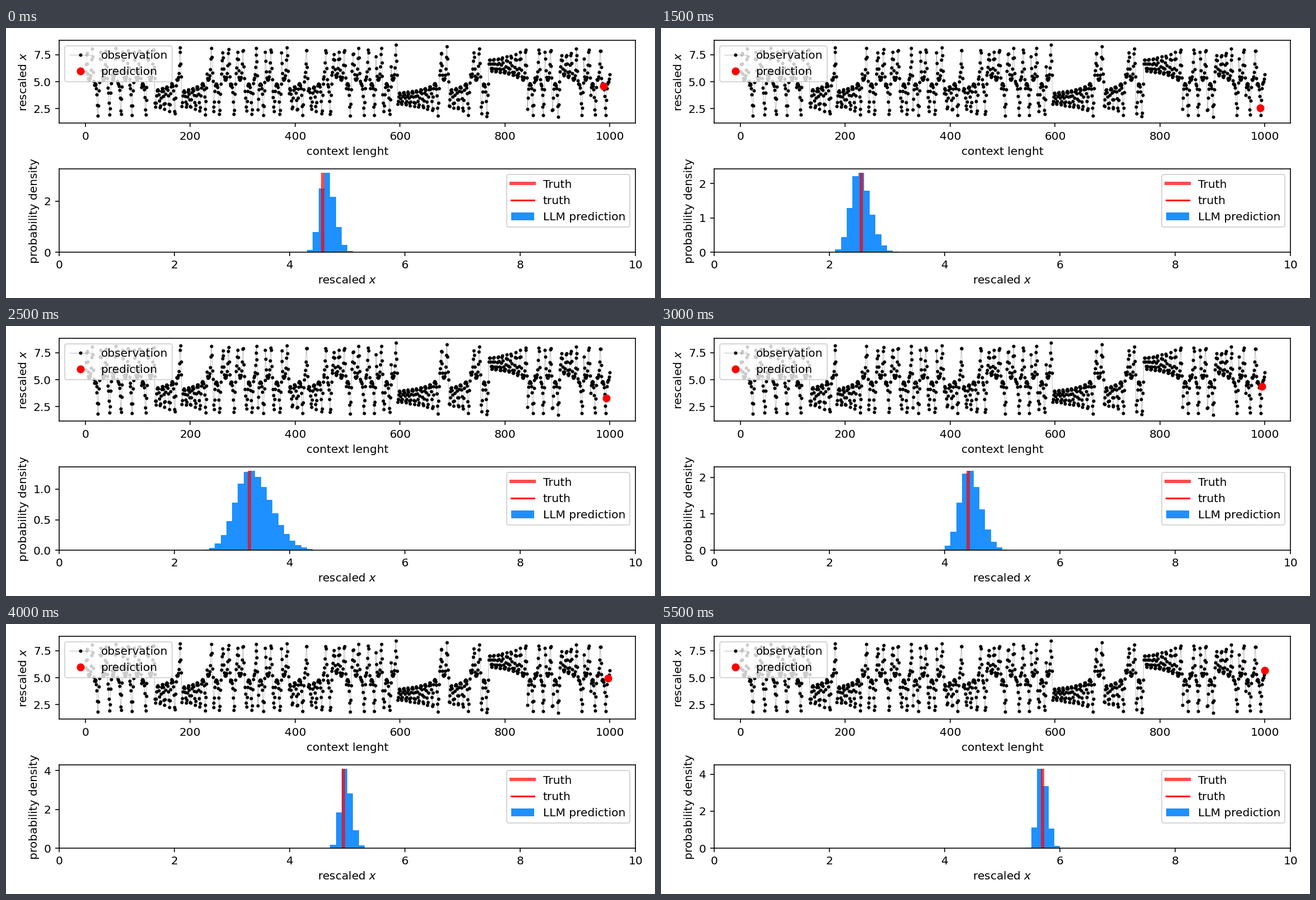
Write a matplotlib script that moves like this. It is 1160 px wide and 483 px high and loops after 6000 ms.

```python
import matplotlib.pyplot as plt
import numpy as np
from matplotlib.animation import FuncAnimation
from matplotlib.lines import Line2D
from matplotlib.patches import Patch

DPI = 145
COUNT, FIRST = 1000, 988
SAMPLE_STEP = 0.08   # Lorenz time between two observations
SCALE = 0.184        # Lorenz x to rescaled x

# Long stays on one wing: number of short visits before it, start, end.
STAYS = [(11, 129.5, 170.6), (1, 180.7, 228.8), (11, 384.2, 414),
         (1, 421.5, 450.4), (2, 466.4, 493.6), (8, 591.9, 671.9),
         (1, 689, 730.2), (2, 765.4, 839.6), (5, 901, 936.2), (5, 991.9, 1003)]

# Per step: true value, most likely prediction, spread of the prediction.
STEPS = [(4.57, 4.62, .12), (4.29, 4.25, .14), (3.66, 3.36, .16),
         (2.55, 2.5, .16), (1.9, 2.16, .13), (3.3, 3.3, .29),
         (4.41, 4.4, .17), (4.79, 4.8, .13), (4.93, 4.95, .093),
         (5.02, 5.05, .055), (5.25, 5.24, .13), (5.7, 5.67, .085)]
BIN = 0.1


def lorenz(state):
    x, y, z = state
    return np.array([10 * (y - x), x * (28 - z) - y, x * y - 8 / 3 * z])


def spiral_out(h=0.005):
    """Follow one trajectory from the wing centre until it leaves the wing."""
    state = np.array([72 ** 0.5 + 1, 72 ** 0.5, 27.0])
    xs = []
    while state[0] > 0 and len(xs) < 16000:
        xs.append(state[0])
        k1 = lorenz(state)
        k2 = lorenz(state + h / 2 * k1)
        k3 = lorenz(state + h / 2 * k2)
        k4 = lorenz(state + h * k3)
        state = state + h / 6 * (k1 + 2 * k2 + 2 * k3 + k4)
    xs = np.array(xs)
    return (np.arange(len(xs)) - xs.argmax()) * h / SAMPLE_STEP, xs


def last_spikes():
    """Index of the last spike of every visit; wings alternate, upper first."""
    rng = np.random.default_rng(4)
    spikes, previous = [], -2
    for visits, start, end in STAYS:
        lengths = rng.uniform(0.6, 1.6, visits)
        spikes.extend(previous + (start - previous) * lengths.cumsum() / lengths.sum())
        spikes.append(end)
        previous = end
    return np.array(spikes)


def observations():
    spikes = last_spikes()
    index = np.arange(COUNT)
    visit = np.searchsorted(spikes + 3, index)
    offset = SCALE * np.interp(index - spikes[visit], *spiral_out())
    # A stronger spike leads to a longer stay on the other wing.
    stay = np.diff(np.append(spikes, 1012))[visit]
    offset += (0.08 + 0.005 * stay) * np.clip(offset - 2, 0, None)
    series = 5 + np.where(visit % 2 == 0, 1, -1) * np.clip(offset, 0, 3.5)
    series[FIRST:] = [truth for truth, _, _ in STEPS]
    return series


def histogram(mode, spread):
    """Densities of a bell with a slightly longer right tail."""
    mids = np.arange(BIN / 2, 10, BIN)
    width = spread * np.where(mids < mode, 0.85, 1.25)
    heights = np.exp(-((mids - mode) / width) ** 2 / 2)
    heights /= heights.sum() * BIN
    shown = heights > 0.01
    return mids[shown], heights[shown]


fig, (top, bottom) = plt.subplots(2, 1, figsize=(1160 / DPI, 483 / DPI), dpi=DPI)

series = observations()
top.plot(series, color="grey", lw=0.25)
top.plot(series, color="black", lw=0, marker="o", ms=2, zorder=2.1)
dot, = top.plot([], [], "ro", zorder=3)
top.set(xlim=(-49.95, 1048.95), ylim=(1.15, 8.85),
        xlabel="context lenght", ylabel="rescaled $x$")
top.legend([Line2D([], [], color="grey", lw=0.25, marker="o", ms=2,
                   mfc="black", mec="black"), dot],
           ["observation", "prediction"], loc="upper left")

BOTTOM_KEYS = [Line2D([], [], color="red", lw=3, alpha=0.7),
               Line2D([], [], color="red", lw=1.5),
               Patch(color="dodgerblue", lw=0)]


def update(step):
    truth, mode, spread = STEPS[step]
    dot.set_data([FIRST + step], [truth])

    mids, heights = histogram(mode, spread)
    peak = heights.max()
    bottom.clear()
    bottom.bar(mids, heights, width=BIN, color="dodgerblue")
    bottom.vlines(truth, 0, peak, color="red", lw=3, alpha=0.7)
    bottom.set(xlim=(0, 10), ylim=(0, 1.05 * peak),
               xlabel="rescaled $x$", ylabel="probability density")
    bottom.legend(BOTTOM_KEYS, ["Truth", "truth", "LLM prediction"],
                  loc="upper right")

    # Start near the final margins so the tick labels are already settled.
    fig.subplots_adjust(left=0.083, right=0.97, bottom=0.175, top=0.956, hspace=0.58)
    fig.tight_layout()
    return []


animation = FuncAnimation(fig, update, frames=len(STEPS), interval=500,
                          repeat=True, repeat_delay=0)
plt.show()
```
